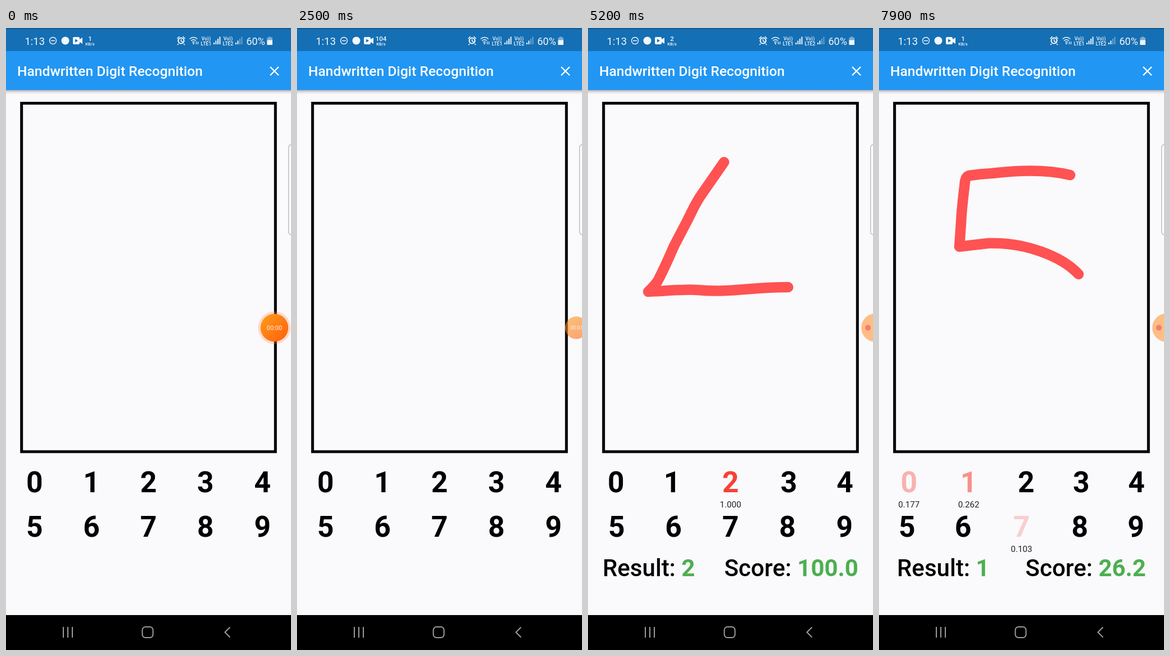
Recreate the animation shown at these times as an HTML page. Size 507x1104 px, loop 8000 ms.

```html
<!DOCTYPE html>
<html lang="en">
<head>
<meta charset="utf-8">
<title>Handwritten Digit Recognition</title>
<style>
  html, body { margin: 0; width: 100%; height: 100%; overflow: hidden; background: #faf9fc; }
  #stage { position: relative; width: 507px; height: 1104px; overflow: hidden; font-family: Roboto, sans-serif; color: #000; }
  svg { position: absolute; left: 0; top: 0; }
  .row { position: absolute; left: 0; width: 507px; display: flex; justify-content: space-around; white-space: pre; }
  .cell { display: flex; flex-direction: column; align-items: center; }
  .cell b { font-size: 51.5px; line-height: 60px; }
  .cell small { font-size: 15.1px; line-height: 17px; margin-top: 1px; color: #222; }
  #low { top: 776.5px; }
  #high { top: 855.5px; }
  #result { top: 933.6px; font-size: 42px; line-height: 50px; font-weight: 500; }
  #result b { color: #4caf50; }
</style>
</head>
<body>
<div id="stage">
  <svg width="507" height="1104" viewBox="0 0 507 1104" font-family="Roboto, sans-serif">
    <defs>
      <linearGradient id="shade" x2="0" y2="1">
        <stop stop-color="#000" stop-opacity=".32"/>
        <stop offset=".45" stop-color="#000" stop-opacity=".1"/>
        <stop offset="1" stop-color="#000" stop-opacity="0"/>
      </linearGradient>
      <linearGradient id="orange" x2="1" y2="1">
        <stop offset=".15" stop-color="#ff9416"/>
        <stop offset=".9" stop-color="#ff6410"/>
      </linearGradient>
      <clipPath id="top"><path d="M0 0H507V110H0z"/></clipPath>
    </defs>

    <path fill="url(#shade)" d="M0 110H507V118H0z"/>
    <path fill="#2196f3" d="M0 41H507V110H0z"/>
    <path fill="#156fb4" d="M0 0H507V41H0z"/>
    <path fill="#115a94" d="M0 0H507V2H0z"/>
    <circle id="ripple" cx="477" cy="76" r="41" fill="#fff" clip-path="url(#top)"/>
    <text x="20" y="85" font-size="24.65" font-weight="500" fill="#fff">Handwritten Digit Recognition</text>
    <path d="M470 69l15 15m0-15l-15 15" stroke="#fff" stroke-width="2.4"/>

    <g fill="#f2f7fb">
      <text x="33.5" y="29.5" font-size="18.4">1:13</text>
      <circle cx="83.5" cy="22.5" r="6" fill="none" stroke="#f2f7fb" stroke-width="1.4"/>
      <path d="M80 21.8h7v1.5h-7z"/>
      <circle cx="105.5" cy="22.5" r="7"/>
      <path d="M121 16h8q2 0 2 2v2l5-3v11l-5-3v2q0 2-2 2h-8q-2 0-2-2v-9q0-2 2-2z"/>
      <path d="M123 19.5l5 3-5 3z" fill="#156fb4"/>
      <g text-anchor="middle" font-weight="500">
        <text id="rate" x="149.5" y="23.3" font-size="11.5"></text>
        <text x="149.5" y="31" font-size="7.6">KB/s</text>
        <text x="356" y="21.8" font-size="8.6">Vo))</text>
        <text x="356" y="31" font-size="8.6">LTE1</text>
        <text x="395" y="21.8" font-size="8.6">Vo))</text>
        <text x="395" y="31" font-size="8.6">LTE2</text>
      </g>
      <circle cx="311.5" cy="22.5" r="5" fill="none" stroke="#f2f7fb" stroke-width="2.2"/>
      <path d="M304.5 19l4-4m10 4l-4-4M307 28l-2 2m11-2l2 2M311.5 19.5v3.5l3 2" fill="none" stroke="#f2f7fb" stroke-width="1.6"/>
      <g fill="none" stroke="#f2f7fb" stroke-width="1.5">
        <path d="M326.500 19.500q7-6 14 0M329 22.500q4.500-3.600 9 0M331.300 25.300q2.200-1.600 4.400 0"/>
        <path d="M338.500 24v5m3 0v-5" stroke-width="1.200"/>
      </g>
      <circle cx="333.500" cy="27.800" r="1.300"/>
      <path d="M369 26h2v3h-2zm3.500-3.500h2V29h-2zM376 19h2v10h-2zm3.500-3.500h2V29h-2z"/>
      <path d="M408 26h2v3h-2zm3.500-3.500h2V29h-2z"/>
      <path d="M415 19h2v10h-2zm3.500-3.500h2V29h-2z" opacity=".4"/>
      <text x="427.500" y="29.500" font-size="18">60%</text>
      <path d="M467 15.500h4.500v1.500h2.500v13h-9.500V17h2.500z" opacity=".45"/>
      <path d="M464.500 21.500h9.500V30h-9.500z"/>
    </g>

    <rect x="27.700" y="133.500" width="451.600" height="618.500" fill="none" stroke="#000" stroke-width="5"/>
    <g id="ink" fill="none" stroke="#ff5252" stroke-width="18.500" stroke-linecap="round" stroke-linejoin="round"></g>

    <rect x="502.700" y="207" width="20" height="160" rx="5" fill="#fdfdfe" stroke="#b9b9bd" stroke-width="1.400"/>

    <g id="timer">
      <circle id="halo" r="29" fill="#ff8a50" opacity=".28"/>
      <circle r="24.700" fill="url(#orange)"/>
      <text id="clock" y="4" font-size="11" fill="#fff" fill-opacity=".85" text-anchor="middle"></text>
    </g>
    <g id="dock">
      <circle cx="511" cy="532" r="25.500" fill="#eadfd8"/>
      <circle cx="511" cy="532" r="24.500" fill="#fdbd83"/>
      <circle cx="498" cy="532" r="5" fill="#f97a70"/>
    </g>

    <path d="M0 1042H507V1104H0z"/>
    <g fill="none" stroke="#9c9c9c" stroke-width="2">
      <path d="M102 1063v19m8-19v19m8-19v19"/>
      <rect x="242.500" y="1063" width="19" height="19" rx="5.500"/>
      <path d="M398.500 1063.500l-9 9 9 9"/>
    </g>
  </svg>
  <div id="low" class="row"></div>
  <div id="high" class="row"></div>
  <div id="result" class="row"></div>
</div>
<script>
const LOOP = 8000, STEP = 100;
const $ = id => document.getElementById(id);

// from, to: drawing time; gone: cleared
const strokes = [
  { from: 200, to: 400, gone: 800, d: 'M262 215C258 340 254 500 255 640' },
  { from: 1100, to: 1600, gone: 2100, d: 'M150 262C175 185 325 160 332 255C335 345 220 520 148 625L362 622' },
  { from: 2800, to: 3600, gone: 4200, d: 'M181 245C215 208 275 183 320 182C350 182 365 202 364 230C362 262 357 280 345 302C325 347 300 385 268 418C250 438 243 447 221 457C250 443 285 433 315 434C365 437 387 475 386 520C385 540 384 555 382 567C374 605 361 630 337 655C297 692 235 702 172 697' },
  { from: 4500, to: 5000, gone: 6500, d: 'M242 238L203 294C190 312 185 326 175 345L153 387C143 410 133 432 124 449Q118 458 107 468C150 466 175 463 195 465C225 468 255 466 290 463Q325 460 356 460' },
  { from: 5400, to: 5800, gone: 6500, d: 'M341 399C338 430 339 460 339 480C344 530 342 590 340 641' },
  { from: 6900, to: 7300, gone: LOOP, d: 'M340 261C300 251 250 252 200 258Q180 259 160 262Q155 263 153 272C150 300 147 320 146 345L143 388' },
  { from: 7500, to: 7900, gone: LOOP, d: 'M143 388L195 382C260 380 325 405 355 437' }
];

// [time, result, probabilities by digit]
const results = [
  [0], [500, 1, { 1: 1 }], [800],
  [1700, 2, { 2: 1 }], [2100],
  [3800, 3, { 3: 1 }], [4200],
  [5100, 2, { 2: 1 }], [6000, 4, { 4: 1 }], [6500],
  [7500, 1, { 0: .177, 1: .262, 7: .103 }]
];
const rates = [[0, 1], [600, 11], [1800, 104], [3000, 0], [4800, 2], [6000, 0], [7500, 1]];
const taps = [700, 2000, 4100, 6350];

const clamp = x => Math.min(1, Math.max(0, x));
const ramp = (t, a, b) => clamp((t - a) / (b - a));
const latest = (table, t) => table.filter(row => row[0] <= t).pop();

for (const s of strokes) {
  s.el = document.createElementNS('http://www.w3.org/2000/svg', 'path');
  s.el.setAttribute('d', s.d);
  s.el.setAttribute('pathLength', 100);
  $('ink').append(s.el);
}

function cell(digit, p) {
  if (!p) return `<div class="cell"><b>${digit}</b></div>`;
  const color = `rgba(244,67,54,${clamp(p * 2.2)})`;
  return `<div class="cell"><b style="color:${color}">${digit}</b><small>${p.toFixed(3)}</small></div>`;
}

let shown;
function showResult(row) {
  if (row === shown) return;
  shown = row;
  const [, best, odds = {}] = row;
  const cells = [...Array(10).keys()].map(n => cell(n, odds[n]));
  $('low').innerHTML = cells.slice(0, 5).join('');
  $('high').innerHTML = cells.slice(5).join('');
  $('result').innerHTML = best === undefined ? '' :
    `<span>Result: <b>${best}</b></span><span>Score: <b>${(odds[best] * 100).toFixed(1)}</b></span>`;
}

function draw(t) {
  for (const { el, from, to, gone } of strokes) {
    el.style.display = t >= from && t < gone ? '' : 'none';
    el.style.strokeDasharray = t >= to ? 'none' : `${100 * ramp(t, from, to) + .01} 300`;
  }
  showResult(latest(results, t));
  $('rate').textContent = latest(rates, t)[1];

  const glow = taps.map(a => ramp(t, a, a + 200) * (1 - ramp(t, a + 250, a + 500)));
  $('ripple').style.opacity = .21 * Math.max(...glow);

  const slide = ramp(t, 300, 600), docked = t >= 3000;
  $('timer').setAttribute('transform', `translate(${477.5 + 19.5 * slide} 532) scale(${1 - .19 * slide})`);
  $('timer').style.opacity = 1 - .42 * slide;
  $('timer').style.display = docked ? 'none' : '';
  $('dock').style.display = docked ? '' : 'none';
  $('halo').style.opacity = .28 * (1 - slide);
  $('clock').textContent = '00:0' + Math.floor((t + 500) / 1000);
}

const start = performance.now();
function tick() {
  const t = (performance.now() - start) % LOOP;
  draw(Math.floor(t / STEP) * STEP);
  requestAnimationFrame(tick);
}
tick();
</script>
</body>
</html>
```
